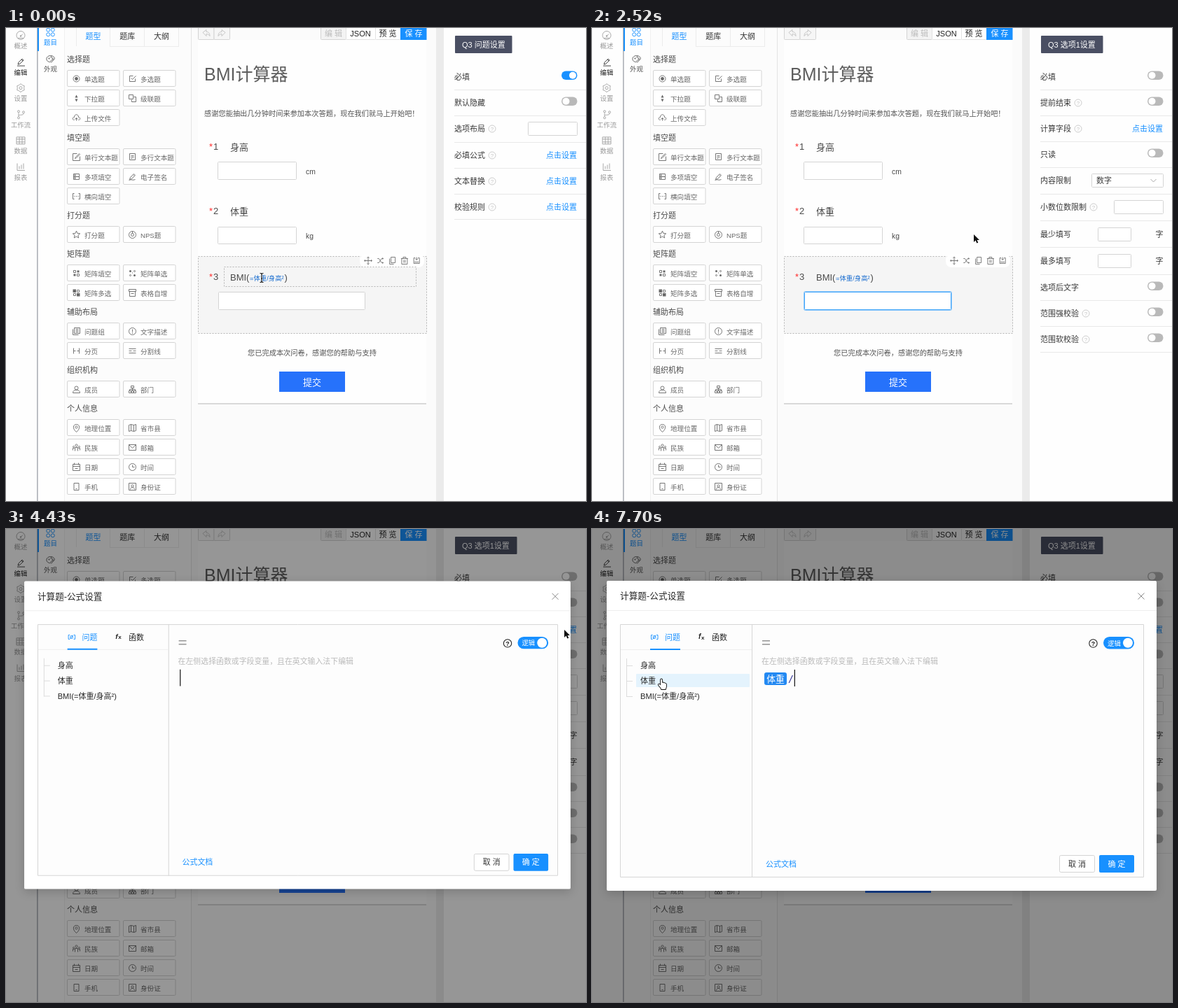
Write an HTML page with a canvas that moves like this. It is 828x676 px and loops after 8000 ms.

```html
<!DOCTYPE html>
<html lang="zh-CN">
<head>
<meta charset="utf-8">
<title>BMI计算器</title>
<style>
html,body{margin:0;width:100%;height:100%;overflow:hidden;background:#fff}
canvas{display:block;width:828px;height:676px}
</style>
</head>
<body>
<canvas id="stage" width="828" height="676"></canvas>
<script>
const ctx = document.getElementById('stage').getContext('2d');
const LOOP = 8000;
const FONT = '"Liberation Sans","Noto Sans CJK SC","Noto Sans CJK",sans-serif';
const BLUE = '#1890ff', INK = '#4a4a4a', LINE = '#d4d4d4';

// Drawing helpers; text is placed by its vertical middle.
function text(s, x, cy, size = 11, color = INK, align = 'left', weight = 400) {
  ctx.font = `${weight} ${size}px ${FONT}`;
  ctx.textAlign = align;
  ctx.fillStyle = color;
  ctx.fillText(s, x, cy + size * 0.375);
}
function fill(x, y, w, h, color, r = 0) {
  ctx.fillStyle = color;
  ctx.beginPath();
  ctx.roundRect(x, y, w, h, r);
  ctx.fill();
}
function frame(x, y, w, h, color = LINE, bg = '#fff', r = 1, dash = []) {
  ctx.beginPath();
  ctx.roundRect(x + .5, y + .5, w - 1, h - 1, r);
  if (bg) { ctx.fillStyle = bg; ctx.fill(); }
  ctx.setLineDash(dash);
  ctx.lineWidth = 1;
  ctx.strokeStyle = color;
  ctx.stroke();
  ctx.setLineDash([]);
}
const hline = (x, y, w, color = '#e8e8e8') => fill(x, y, w, 1, color);
const vline = (x, y, h, color = '#e8e8e8') => fill(x, y, 1, h, color);
function disc(x, y, r, color) {
  ctx.fillStyle = color;
  ctx.beginPath();
  ctx.arc(x, y, r, 0, 7);
  ctx.fill();
}

// Icons are [outline, solid] paths around their centre.
const C = (x, y, r) => `M${x - r} ${y}a${r} ${r} 0 1 0 ${2 * r} 0a${r} ${r} 0 1 0 ${-2 * r} 0z`;
const R = (x, y, w, h = w) => `M${x} ${y}h${w}v${h}h${-w}z`;
const PEN = 'M-4 4l1-3l5-5l2 2l-5 5zM1-3l2 2';
const PERSON = C(0, -2, 2.5) + 'M-5 5c0-3 2-4 5-4s5 1 5 4z';
// Closed outline that alternates between two radii.
const spikes = (n, outer, inner) => 'M' + Array.from({length: 2 * n}, (_, i) => {
  const r = i % 2 ? inner : outer, a = i * Math.PI / n;
  return [r * Math.sin(a), -r * Math.cos(a)].map(v => v.toFixed(2));
}).join('L') + 'z';
const icons = {
  radio: [C(0, 0, 4.5), C(0, 0, 2.4)],
  check: ['M4 0v4h-8v-8h5M-2-1l2 2l5-5'],
  drop: ['', 'M-2-1h4l-2-4zM-2 1h4l-2 4z'],
  cascade: [R(-5, -5, 6) + 'M2-2h3v7h-6v-3'],
  cloud: ['M-3 3c-3 0-3-4 0-4c0-5 6-5 6 0c3 0 3 4 0 4M0 4v-4m-2 2l2-2l2 2'],
  write: ['M5-1v6h-10v-10h6M-2 2l1-2l5-5l1 1l-5 5z'],
  lines: [R(-4, -5, 8, 9) + 'M-2-2h4M-2 0h4M-2 2h2'],
  rows: [R(-4, -4, 8, 4) + R(-4, 0, 8, 4), R(-3, -3, 2) + R(-3, 1, 2)],
  pen: [PEN + 'M-5 5c4-2 5 1 9-1'],
  brackets: ['M-3-4h-2v8h2M3-4h2v8h-2', R(-3, -.5, 1) + R(-.5, -.5, 1) + R(2, -.5, 1)],
  star: [spikes(5, 5.5, 2.5)],
  nps: [C(0, 0, 5) + C(0, 0, 2) + 'M0-5v3'],
  gridA: [R(-4, -4, 3) + R(1, 1, 3), R(1, -4, 3) + R(-4, 1, 3)],
  gridB: [C(-3, 3, 1) + C(3, -3, 1), C(-3, -3, 1.5) + C(3, 3, 1.5) + R(-.5, -1, 1)],
  gridC: [R(1, -4, 3) + R(-4, 1, 3), R(-5, -5, 4.5) + R(.5, .5, 4.5)],
  table: [R(-5, -5, 10, 3) + 'M-4-2v7h8v-7M-2 1h4'],
  group: [R(-3, -5, 8) + 'M-5-3v8h8M-1-3h4M-1-1h4M-1 1h4'],
  info: [C(0, 0, 5) + 'M0-3v4', R(-.6, 2, 1.2)],
  page: ['M-4-4v8M4-4v8M-4 0h3M1 0h3'],
  split: ['M-5-3h10M-5 0h4M1 0h4M-5 3h10'],
  person: [PERSON],
  tree: [R(-2, -5, 4, 3) + R(-5, 2, 3) + R(-1.5, 2, 3) + R(2, 2, 3) + 'M0-2v4M-4 2v-2h8v2'],
  pin: ['M0 6c-6-5-5-11 0-11s6 6 0 11z' + C(0, -1, 1.6)],
  map: ['M-5-4l3-1l4 1l3-1v9l-3 1l-4-1l-3 1zM-2-5v9M2-4v9'],
  people: [C(0, -3, 1.6) + C(-4, -1, 1) + C(4, -1, 1) + 'M-2 5v-5h4v5M-5 4v-3h2M5 4v-3h-2'],
  mail: [R(-5, -4, 10, 8) + 'M-5-4l5 5l5-5'],
  date: [R(-5, -4, 10, 9) + 'M-5-1h10M-3-6v3M3-6v3M-2 2h4'],
  clock: [C(0, 0, 5) + 'M0-3v3h3'],
  phone: [R(-3.5, -5, 7, 10) + 'M-1 3h2'],
  card: [R(-5, -5, 10) + C(0, -1, 1.7) + 'M-3 4c0-4 6-4 6 0'],
  gauge: [C(0, 0, 6) + 'M0 1l3-3M-4 4h8', C(0, 1, 1.2)],
  edit: [PEN + 'M-5 6h11'],
  gear: [spikes(6, 6, 4.7) + C(0, 0, 2)],
  branch: [C(-3, -4, 1.5) + C(4, -3, 1.5) + C(-3, 5, 1.5) + 'M-3-2v5M4-1c0 3-6 1-7 3'],
  data: [R(-6, -5, 12, 10) + 'M-6-2h12M-6 2h12M-2-5v10M2-5v10'],
  chart: ['M-5-5v10h11M-2 3v-4M1 3v-6M4 3v-8'],
  four: [C(-3.3, -3.3, 2.5) + C(3.3, -3.3, 2.5) + C(-3.3, 3.3, 2.5) + C(3.3, 3.3, 2.5)],
  palette: ['M-2 4c-6-2-4-9 2-9s8 6 3 6c-4 0-1 4-5 3z' + C(-2, -1, .7) + C(1, -3, .7) + C(3, -1, .7) + 'M1 5l4-5'],
  undo: ['M-5-1l5-4v3c4 0 5 3 5 6c-1-2-3-3-5-3v3z'],
  move: ['M-5 0h10M0-5v10M-4-1.5l-1.5 1.5l1.5 1.5M4-1.5l1.5 1.5l-1.5 1.5M-1.5-4l1.5-1.5l1.5 1.5M-1.5 4l1.5 1.5l1.5-1.5'],
  shuffle: ['M-4-3h2l4 6h2M-4 3h2l4-6h2M3-4l1.5 1l-1.5 1M3 2l1.5 1l-1.5 1'],
  copy: [R(-2, -5, 6, 8) + 'M-4-3v8h6'],
  trash: ['M-5-3h10M-2-3v-2h4v2M-4-3v8h8v-8M-1-1v4M1-1v4'],
  save: ['M-2-4h-2v8h8v-8h-2M0-5v4m-2-2l2 2l2-2M-3 2h6'],
};
function icon(name, x, y, color = '#686868', flip = 1) {
  const [line, solid] = icons[name];
  ctx.save();
  ctx.translate(x, y);
  ctx.scale(flip, 1);
  ctx.lineWidth = .9;
  ctx.strokeStyle = ctx.fillStyle = color;
  ctx.stroke(new Path2D(line));
  if (solid) ctx.fill(new Path2D(solid));
  ctx.restore();
}
function strokePath(d, color, width = 1) {
  ctx.strokeStyle = color;
  ctx.lineWidth = width;
  ctx.stroke(new Path2D(d));
}

// Sidebars
const nav = [['gauge', '概述'], ['edit', '编辑'], ['gear', '设置'],
  ['branch', '工作流'], ['data', '数据'], ['chart', '报表']];
const palette = [
  [45, '选择题', 'radio 单选题 check 多选题 drop 下拉题 cascade 级联题 cloud 上传文件'],
  [157, '填空题', 'write 单行文本题 lines 多行文本题 rows 多项填空 pen 电子签名 brackets 横向填空'],
  [268, '打分题', 'star 打分题 nps NPS题'],
  [323, '矩阵题', 'gridA 矩阵填空 gridB 矩阵单选 gridC 矩阵多选 table 表格自增'],
  [406, '辅助布局', 'group 问题组 info 文字描述 page 分页 split 分割线'],
  [489, '组织机构', 'person 成员 tree 部门'],
  [544, '个人信息', 'pin 地理位置 map 省市县 people 民族 mail 邮箱 date 日期 clock 时间 phone 手机 card 身份证'],
];
function sidebars() {
  nav.forEach(([name, label], i) => {
    const on = i === 1, y = 10.5 + i * 37.6;
    icon(name, 21, y, on ? '#333' : '#a0a0a0');
    text(label, 21, y + 15, 9.4, on ? '#222' : '#999', 'center', on ? 500 : 400);
  });
  vline(44.4, 0, 676, '#7c808c');
  fill(45, 0, 2, 33, BLUE);
  icon('four', 63.5, 6, BLUE);
  text('题目', 63.5, 20.5, 9.5, BLUE, 'center');
  icon('palette', 63.5, 44.5, '#555');
  text('外观', 63.5, 58, 9.5, '#555', 'center');

  fill(83, 0, 181, 676, '#fcfcfc');
  vline(83, 0, 676, '#f0f0f0');
  vline(264, 0, 676, '#e4e4e4');
  [100, 148, 197, 246].forEach(x => vline(x, 0, 26, '#ececec'));
  hline(148, 26, 99, '#ececec');
  ['题型', '题库', '大纲'].forEach((s, i) =>
    text(s, 124.5 + i * 48.7, 11.5, 11, i ? '#333' : BLUE, 'center', 500));
  for (const [y, title, list] of palette) {
    text(title, 87, y, 11);
    const parts = list.split(' ');
    for (let i = 0; i < parts.length; i += 2) {
      const x = 87 + (i / 2 % 2) * 80, cy = y + 27.5 + (i >> 2) * 28.1;
      const top = Math.floor(cy - 12);
      frame(x, top, 75.5, 24, LINE, '#fff', 1.5);
      icon(parts[i], x + 13.5, top + 12.5);
      text(parts[i + 1], x + 25, cy + 1, 9.6, '#686868');
    }
  }
}

// Survey form
function question(n, cy, label) {
  text('*', 290, cy - 1, 13, '#ff2a2a');
  text(n, 296, cy - .7, 13);
  text(label, 320, cy, 13);
}
function form(s) {
  fill(265, 0, 349, 676, '#fbfbfb');
  fill(614, 0, 11, 676, '#ebebeb');
  fill(274, 17, 326, 520, '#fefefe');
  fill(274, 536, 326, 2, '#d9d9d9');
  frame(274, -8, 23.5, 25, LINE, '#f6f6f6');
  frame(296.5, -8, 23.5, 25, LINE, '#f6f6f6');
  icon('undo', 286, 7.5, '#c0c0c0');
  icon('undo', 308, 7.5, '#c0c0c0', -1);
  frame(449, -8, 37, 25, LINE, '#f3f3f3');
  frame(485, -8, 43, 25, '#e2e2e2');
  frame(527, -8, 37, 25, '#e2e2e2');
  fill(563, -8, 37.5, 25, BLUE);
  text('编 辑', 467.5, 8, 11, '#bbb', 'center');
  text('JSON', 506, 8, 11, '#222', 'center');
  text('预 览', 545, 8, 11, '#222', 'center');
  text('保 存', 582, 8, 11, '#fff', 'center');

  text('BMI计算器', 283, 65.5, 25, '#5c5c5c');
  text('感谢您能抽出几分钟时间来参加本次答题，现在我们就马上开始吧！', 283, 122, 10.22, '#525252');
  question('1', 170, '身高');
  frame(302, 191, 113, 26);
  text('cm', 428, 205, 10.4);
  question('2', 262, '体重');
  frame(302, 284, 113, 25);
  text('kg', 428, 297.5, 10.4);

  frame(274, 326, 327, 111, '#b4b4b4', '#f5f5f5', 0, [2, 2]);
  fill(505, 323, 92, 19, '#fff', 8);
  ['move', 'shuffle', 'copy', 'trash', 'save'].forEach((name, i) =>
    icon(name, 517 + i * 17.3, 332.5, '#707070'));
  if (s.title === 'hover') frame(311, 341, 275, 29, '#b4b4b4', null, 0, [2, 2]);
  if (s.title === 'soft') frame(311, 341, 275, 29, '#8cc4f5', null);
  if (s.title === 'focus') frame(311, 341, 275, 29, '#3a9ff5', null);
  question('3', 356, 'BMI(');
  text('=体重/身高²', 348, 357, 9.4, '#1d6fd0', 'left', 500);
  text(')', 397.5, 356, 13);
  frame(303, 377, 210, 26);
  if (s.input === 'focus') {
    frame(302, 376, 212, 28, '#8cc8fb', null, 2);
    frame(303, 377, 210, 26, '#45a6f8');
  }
  if (s.input === 'blur') {
    frame(302, 376, 212, 28, '#d3e8fb', null, 2);
    frame(303, 377, 210, 26, '#74bcfb');
  }
  if (s.caret) vline(333, 384, 13, '#222');

  text('您已完成本次问卷，感谢您的帮助与支持', 345, 464.5, 10.22, '#525252');
  fill(390, 491, 94, 29, '#2672fb');
  text('提交', 437, 506, 13, '#fff', 'center');
}

// Settings panel
function toggle(cy, on) {
  fill(793, cy - 6, 22.5, 12.5, on ? BLUE : '#b9b9b9', 6.25);
  disc(on ? 809 : 799.5, cy + .25, 5, '#fff');
}
function help(x, cy) {
  strokePath(C(x, cy, 5), '#c8c8c8', .9);
  text('?', x, cy, 8, '#c4c4c4', 'center');
}
const blocks = {
  question: [
    [70, '必填', 'on', 88], [107, '默认隐藏', 'off', 125],
    [144, '选项布局', 'box', 163, 694], [182, '必填公式', 'link', 200, 694],
    [219, '文本替换', 'link', 237, 694], [256, '校验规则', 'link', 273, 694],
  ],
  option: [
    [70, '必填', 'off', 88], [107, '提前结束', 'off', 125, 694],
    [144, '计算字段', 'link', 162, 694], [181, '只读', 'off', 199],
    [218, '内容限制', 'select', 237], [256, '小数位数限制', 'box', 275, 716],
    [295, '最少填写', 'count', 313], [333, '最多填写', 'count', 352],
    [371, '选项后文字', 'off', 389], [408, '范围强校验', 'off', 426, 705],
    [445, '范围软校验', 'off', 463, 705],
  ],
};
function settings(s) {
  fill(625, 0, 203, 676, '#fefefe');
  const option = s.panel === 'option';
  fill(641, 11, option ? 88.5 : 81.5, 25, '#4a4f63', 1);
  text(option ? 'Q3 选项1设置' : 'Q3 问题设置', 651, 23.5, 11, '#fff');
  for (const [cy, label, kind, rule, mark] of blocks[s.panel]) {
    text(label, 640, cy, 11, '#383838');
    hline(640, rule, 188);
    if (mark) help(mark, cy);
    if (kind === 'on' || kind === 'off') toggle(cy - 2.5, kind === 'on');
    if (kind === 'link') text('点击设置', 771, cy, 11, s.hoverLink ? '#45a9fb' : BLUE);
    if (kind === 'box') frame(745, cy - 10, 71, 20);
    if (kind === 'count') {
      frame(722, cy - 10, 48, 20);
      text('字', 804.5, cy, 11, '#383838');
    }
    if (kind === 'select') {
      frame(713, cy - 10, 103, 20);
      text('数字', 720, cy, 11, '#383838');
      strokePath(`M797.5 ${cy - 2}l4 4l4-4`, '#aaa');
    }
  }
}

// Formula dialog
function dialog(s) {
  ctx.save();
  ctx.translate(797, 150);
  ctx.scale(s.zoom, s.zoom);
  ctx.translate(-797, -150);
  ctx.shadowColor = 'rgba(0,0,0,.18)';
  ctx.shadowBlur = 14;
  ctx.shadowOffsetY = 4;
  fill(21, 74, 785, 443, '#fff', 2);
  ctx.shadowColor = 'transparent';
  text('计算题-公式设置', 40, 95.5, 12.7, '#262626', 'left', 500);
  strokePath('M779.5 91.5l9 9m0-9l-9 9', '#888');
  hline(21, 116, 785, '#eee');
  frame(40, 136, 748, 362, '#d6d6d6', '#fdfdfd', 0);
  vline(228, 136, 362, '#d6d6d6');
  hline(41, 172, 187, '#eee');
  fill(83, 171, 43, 2, BLUE);
  strokePath('M86.5 151.5h-2v6h2M92 151.5h2v6h-2M91 152l-4 5' + C(89, 154.5, 2), BLUE, .9);
  text('问题', 104, 155, 11, BLUE, 'left', 500);
  text('f', 152, 153.5, 10, '#222', 'left', 'italic 600');
  text('x', 156, 154.5, 8, '#222', 'left', 600);
  text('函数', 171, 155, 11, '#222');

  vline(49, 185, 55, '#dcdcdc');
  [195, 217, 239].forEach(y => hline(49, y, 9, '#dcdcdc'));
  if (s.hoverRow) fill(63, 207, 162, 19, '#e4f3fd', 1);
  ['身高', '体重', 'BMI(=体重/身高²)'].forEach((label, i) =>
    text(label, 69, 195 + i * 22, 11.1, '#262626'));

  fill(243, 159, 11, 1.6, '#999');
  fill(243, 164, 11, 1.6, '#999');
  strokePath(C(715.5, 163.5, 5.7), '#222', 1.1);
  text('?', 715.5, 163.5, 9, '#222', 'center', 600);
  fill(730, 154, 44, 17.5, BLUE, 8.75);
  text('逻辑', 736, 163, 9.5, '#fff');
  disc(765, 162.8, 7, '#fff');
  text('在左侧选择函数或字段变量，且在英文输入法下编辑', 242, 189, 10.96, '#bababa');
  if (s.tag) {
    fill(246, 205, 32, 18, '#2389f2', 3);
    text('体重', 262, 214, 12.8, '#fff', 'center');
  }
  if (s.slash) text('/', 281.5, 214, 15, '#2a2a90', 'left', 'italic 400');
  if (s.editCaret) fill(s.editCaret, 201, 1.3, 24, '#222');

  text('公式文档', 248, 478.5, 11, BLUE);
  frame(667, 466, 51, 25, LINE, '#fff', 2);
  text('取 消', 692.5, 478.5, 11, '#333', 'center');
  fill(724, 466, 50, 25, BLUE, 2);
  text('确 定', 749, 478.5, 11, '#fff', 'center');
  ctx.restore();
}

// Pointer
const shapes = {
  arrow: 'M0 0v11l2.6-2.4l1.7 4l2-.9l-1.7-3.8h3.4z',
  hand: 'M0 1c0-2 2-2 2.2 0v4c1-1 2-.6 2 .4c1-.7 2-.3 2 .6c1-.5 1.8 0 1.8 1v3c0 2-1 2-1 4h-6c0-2-3-4-4-6c-.6-1.5 1-2 2-.6l1 1z',
};
function pointer({x, y, kind}) {
  ctx.save();
  ctx.translate(x, y);
  if (kind === 'beam') {
    const d = 'M-2.5-6.5c1.5 0 2.5.4 2.5 1.5c0-1.1 1-1.5 2.5-1.5M-2.5 6.5c1.5 0 2.5-.4 2.5-1.5c0 1.1 1 1.5 2.5 1.5M0-5v10M-1 1h2';
    strokePath(d, '#fff', 2.4);
    strokePath(d, '#111', 1.2);
  } else {
    const p = new Path2D(shapes[kind]), hand = kind === 'hand';
    ctx.lineJoin = 'round';
    ctx.lineWidth = hand ? 1.8 : 1.6;
    ctx.strokeStyle = hand ? '#111' : '#fff';
    ctx.fillStyle = hand ? '#fff' : '#111';
    ctx.stroke(p);
    ctx.fill(p);
  }
  ctx.restore();
}

const track = [[0, 365, 357], [1335, 365, 357], [1336, 367, 390], [1700, 367, 390],
  [3545, 797, 160], [3692, 797, 144], [4420, 797, 144], [5158, 204, 153],
  [5309, 196, 150], [5456, 136, 184], [5603, 98, 215], [LOOP, 98, 215]];
const ease = u => u * u * (3 - 2 * u);
function pointerAt(t) {
  const i = Math.max(1, track.findIndex(k => k[0] > t));
  const [t0, x0, y0] = track[i - 1], [t1, x1, y1] = track[i];
  const u = ease((t - t0) / (t1 - t0));
  const x = x0 + (x1 - x0) * u, y = y0 + (y1 - y0) * u;
  const inInput = x > 302 && x < 513 && y > 377 && y < 403;
  const kind = t < 1335 || (t < 4000 && inInput) ? 'beam'
    : (t > 3690 && t < 4270) || t > 5600 ? 'hand' : 'arrow';
  return {x: Math.round(x), y: Math.round(y), kind};
}
function stateAt(t) {
  const within = (a, b) => t >= a && t < b;
  const step = t < 1340 ? t : Math.min(1340 + Math.floor((t - 1335) / 147) * 147, t);
  const opened = t >= 1640;
  return {
    title: t < 900 ? 'hover' : t < 1050 ? 'soft' : opened ? '' : 'focus',
    panel: opened ? 'option' : 'question',
    input: !opened ? '' : t < 4280 ? 'focus' : 'blur',
    caret: within(1640, 4280) && (step < 1780 || (step - 1780) % 1060 < 530),
    hoverLink: within(3700, 4430),
    mask: t < 4280 ? 0 : t < 4430 ? .08 : t < 4570 ? .41 : .45,
    dialog: t >= 4430,
    zoom: t < 4570 ? .9935 : 1,
    hoverRow: t >= 5610,
    tag: t >= 5910,
    slash: t >= 7560,
    editCaret: within(4430, 4870) ? 244.5
      : within(6060, 6510) || within(7110, 7560) ? 279
      : t >= 7700 ? 288.7 : 0,
    pointer: pointerAt(step),
  };
}
function draw(t) {
  const s = stateAt(t);
  fill(0, 0, 828, 676, '#fefefe');
  sidebars();
  form(s);
  settings(s);
  if (s.mask) fill(0, 0, 828, 676, `rgba(0,0,0,${s.mask})`);
  if (s.dialog) dialog(s);
  pointer(s.pointer);
}
const start = performance.now();
function tick() {
  draw((performance.now() - start) % LOOP);
  requestAnimationFrame(tick);
}
tick();
</script>
</body>
</html>
```
